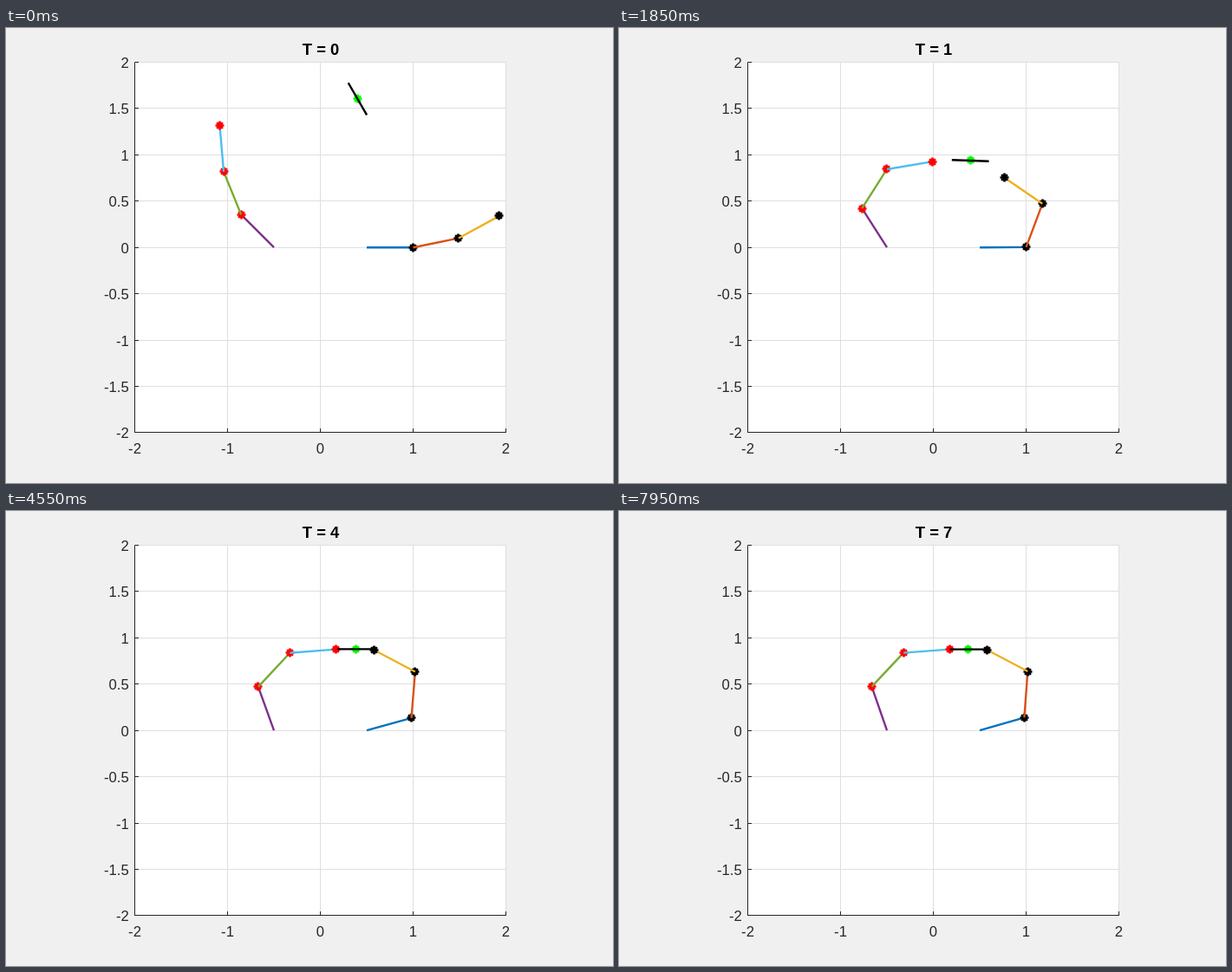
Animation of 700x525 px, one loop 8 s. Source, as an HTML page:

```html
<!DOCTYPE html>
<html lang="en">
<head>
<meta charset="utf-8">
<title>Two arms</title>
<style>
  html, body { margin: 0; width: 100%; height: 100%; overflow: hidden; background: #f0f0f0; }
  svg { display: block; width: 700px; height: 525px; }
  text { font: 16.67px "Liberation Sans", Arial, sans-serif; fill: #262626; }
  .title { font-size: 18.33px; font-weight: bold; fill: #000; text-anchor: middle; }
  .x { text-anchor: middle; }
  .y { text-anchor: end; }
  .grid { stroke: #dfdfdf; }
  .axis { stroke: #262626; }
  .link { stroke-width: 2.4; }
  .star { stroke-width: 2.7; }
</style>
</head>
<body>
<svg id="stage" viewBox="0 0 700 525"></svg>
<script>
const stage = document.getElementById('stage');
const LOOP = 8000, STEP = 50;
const LINK = 53.5, HALF_BAR = 21.4;

const snap = v => Math.floor(v) + 0.5;
const xAt = v => 362.5 + 107 * v;
const yAt = v => 253.2 - 106.85 * v;
const LEFT = snap(xAt(-2)), RIGHT = snap(xAt(2));
const TOP = snap(yAt(2)), BOTTOM = snap(yAt(-2));

function add(tag, attrs, text) {
  const el = document.createElementNS('http://www.w3.org/2000/svg', tag);
  for (const key in attrs) el.setAttribute(key, attrs[key]);
  if (text !== undefined) el.textContent = text;
  return stage.appendChild(el);
}
const line = (cls, x1, y1, x2, y2) => add('line', { class: cls, x1, y1, x2, y2 });

function drawAxes() {
  add('rect', { x: LEFT, y: TOP, width: RIGHT - LEFT, height: BOTTOM - TOP, fill: '#fff' });
  for (let v = -2; v <= 2; v++) line('grid', snap(xAt(v)), TOP, snap(xAt(v)), BOTTOM);
  for (let v = -2; v <= 2; v += 0.5) line('grid', LEFT, snap(yAt(v)), RIGHT, snap(yAt(v)));
  line('axis', LEFT, TOP, LEFT, BOTTOM + 0.5);
  line('axis', LEFT, BOTTOM, RIGHT + 0.5, BOTTOM);
  for (let v = -2; v <= 2; v++) {
    const x = snap(xAt(v));
    line('axis', x, BOTTOM, x, BOTTOM - 4.5);
    add('text', { class: 'x', x, y: 491 }, v);
  }
  for (let v = -2; v <= 2; v += 0.5) {
    const y = snap(yAt(v));
    line('axis', LEFT, y, LEFT + 4.5, y);
    add('text', { class: 'y', x: 141.7, y: y + 6.5 }, v);
  }
}

const makeLink = color => add('line', { class: 'link', stroke: color });
const makeStar = color => add('path', {
  class: 'star', stroke: color,
  d: 'M-5 0H5M0-5V5M-3.4-3.4L3.4 3.4M-3.4 3.4L3.4-3.4'
});

function place(el, x1, y1, x2, y2) {
  Object.entries({ x1, y1, x2, y2 }).forEach(([key, v]) => el.setAttribute(key, v));
}
const moveStar = (el, x, y) =>
  el.setAttribute('transform', `translate(${snap(x)} ${snap(y)})`);

// Decays to rest at the given rate while a push swells in at speed ramp.
function settle({ start, rest, push, ramp, rate }) {
  return t => {
    const swell = 1 - Math.exp(-Math.pow(ramp * t, 1.5));
    const offset = start - rest;
    return rest + (offset + (push - offset) * swell) * Math.exp(-rate * t);
  };
}

// Each joint gives the absolute angle of its link in degrees.
function makeArm(base, starColor, joints) {
  const parts = joints.map(joint => ({
    angle: settle(joint), link: makeLink(joint.color), star: makeStar(starColor)
  }));
  return t => {
    let x = xAt(base), y = yAt(0);
    for (const { angle, link, star } of parts) {
      const a = angle(t) * Math.PI / 180;
      const endX = x + LINK * Math.cos(a), endY = y - LINK * Math.sin(a);
      place(link, x, y, endX, endY);
      moveStar(star, endX, endY);
      x = endX;
      y = endY;
    }
  };
}

function makeBar() {
  const star = makeStar('#0f0'), bar = makeLink('#000');
  return t => {
    const sway = 2.6 * Math.exp(-0.6 * t) * Math.sin(Math.PI * t / 1.3);
    const x = 402.6 + 2.8 * Math.exp(-0.25 * t) - sway;
    const y = 159.6 - 77.8 * Math.exp(-1.33 * t);
    const tilt = Math.PI / 3 * Math.exp(-1.83 * t);
    const dx = HALF_BAR * Math.cos(tilt), dy = HALF_BAR * Math.sin(tilt);
    moveStar(star, x, y);
    place(bar, x - dx, y - dy, x + dx, y + dy);
  };
}

drawAxes();
const title = add('text', { class: 'title', x: 363, y: 31 });
const movers = [
  makeArm(0.5, '#000', [
    { color: '#0072bd', start: 0, rest: 16.1, push: -177, ramp: 1.43, rate: 1.3 },
    { color: '#d95319', start: 11.5, rest: 85.8, push: -188, ramp: 2.7, rate: 1.32 },
    { color: '#edb120', start: 28.6, rest: 152.2, push: -268, ramp: 2.7, rate: 2 }
  ]),
  makeArm(-0.5, '#f00', [
    { color: '#7e2f8e', start: 135, rest: 109.1, push: 103, ramp: 1.8, rate: 1.1 },
    { color: '#77ac30', start: 112.1, rest: 46.8, push: 143, ramp: 1.64, rate: 1.4 },
    { color: '#4dbeee', start: 94.9, rest: 4.3, push: 111, ramp: 2.7, rate: 1.65 }
  ]),
  makeBar()
];

function draw(ms) {
  const t = Math.floor(ms / STEP) * STEP / 1000;
  movers.forEach(move => move(t));
  title.textContent = 'T = ' + Math.floor(t);
}

const begin = performance.now();
function tick() {
  draw((performance.now() - begin) % LOOP);
  requestAnimationFrame(tick);
}
tick();
</script>
</body>
</html>
```
